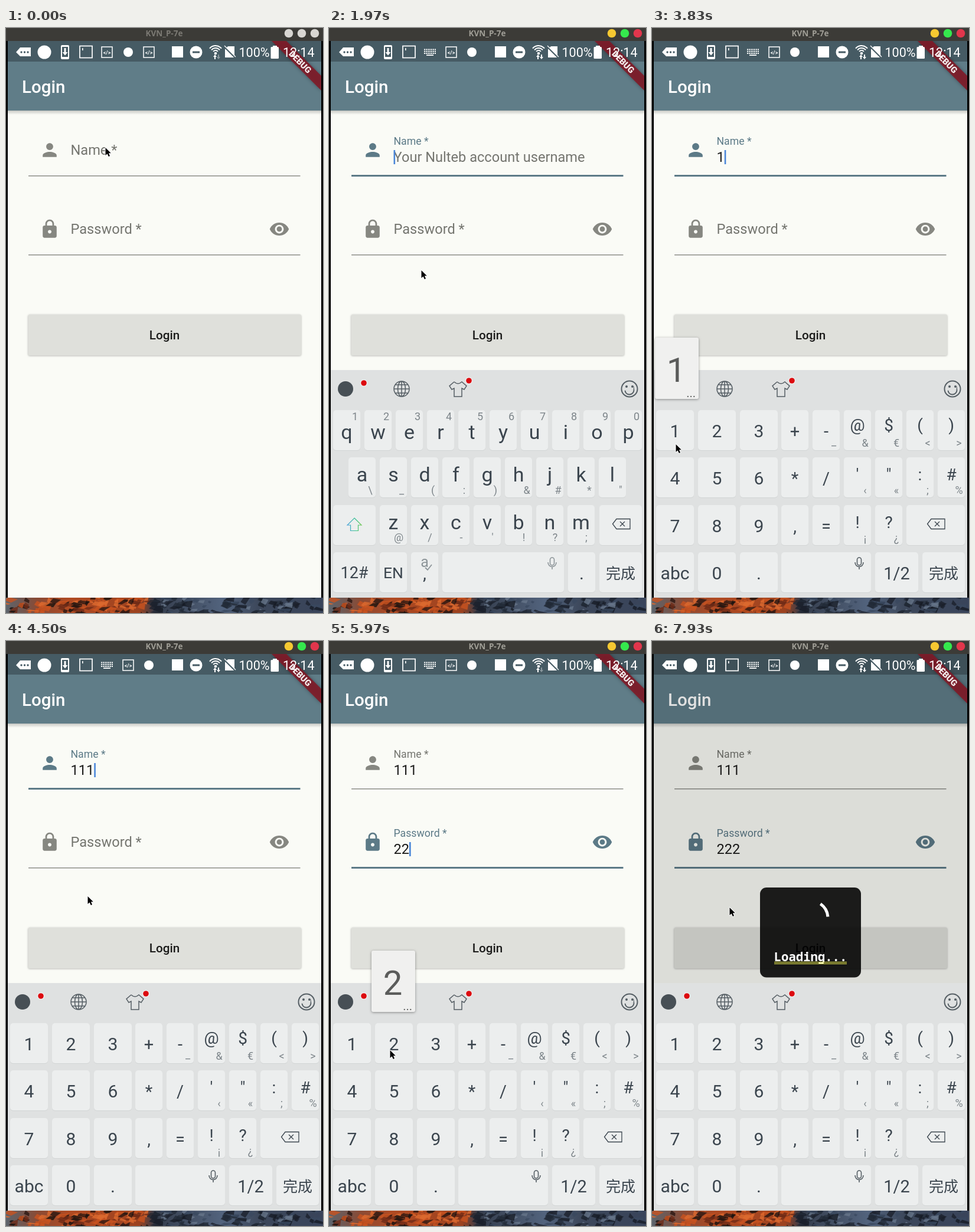
An HTML page with a canvas for the animation above (8 s loop, 537 by 992 pixels).

```html
<!DOCTYPE html>
<html lang="en">
<head>
<meta charset="utf-8">
<title>Login</title>
<style>
  html, body { margin: 0; width: 100%; height: 100%; overflow: hidden; background: #000; }
  canvas { display: block; width: 100vw; height: 100vh; }
</style>
</head>
<body>
<canvas id="stage" width="537" height="992"></canvas>
<script>
const LOOP = 8000, W = 537, H = 992, TAU = Math.PI * 2;
const ctx = document.getElementById('stage').getContext('2d');

const ONES = [3780, 4010, 4270], TWOS = [5650, 5930, 6150];
const NAME_FOCUS = 400, PASS_FOCUS = 5050, KEYS_IN = 1120, KEYS_SWAP = 3220, DIALOG = 6755;
const ACCENT = '#5c7a87', GREY = '#868781', HINT = '#74756f', INK = '#1c1c1b';

// time, x, y of the pointer tip
const POINTER = [
  [0, 168, 202], [650, 168, 202], [1200, 171, 285], [1750, 165, 300], [2500, 120, 830],
  [2970, 75, 948], [3300, 75, 948], [3720, 40, 705], [4290, 40, 705], [4500, 138, 432],
  [4850, 160, 340], [5100, 160, 340], [5550, 103, 697], [5970, 103, 693], [6200, 103, 693],
  [6600, 206, 526], [7000, 206, 526], [7700, 131, 451], [LOOP, 131, 451]
];

const PERSON = new Path2D('M12 12c2.21 0 4-1.79 4-4s-1.79-4-4-4-4 1.79-4 4 1.79 4 4 4zm0 2c-2.67 0-8 1.34-8 4v2h16v-2c0-2.66-5.33-4-8-4z');
const LOCK = new Path2D('M18 8h-1V6c0-2.76-2.24-5-5-5S7 3.24 7 6v2H6c-1.1 0-2 .9-2 2v10c0 1.1.9 2 2 2h12c1.1 0 2-.9 2-2V10c0-1.1-.9-2-2-2zm-6 9c-1.1 0-2-.9-2-2s.9-2 2-2 2 .9 2 2-.9 2-2 2zm3.1-9H8.9V6c0-1.71 1.39-3.1 3.1-3.1 1.71 0 3.1 1.39 3.1 3.1v2z');
const EYE = new Path2D('M12 4.5C7 4.5 2.73 7.61 1 12c1.73 4.39 6 7.5 11 7.5s9.27-3.11 11-7.5c-1.73-4.39-6-7.5-11-7.5zM12 17c-2.76 0-5-2.24-5-5s2.24-5 5-5 5 2.24 5 5-2.24 5-5 5zm0-8c-1.66 0-3 1.34-3 3s1.34 3 3 3 3-1.34 3-3-1.34-3-3-3z');
const ARROW = new Path2D('M.5 1V14L3.6 11.2 5.8 16 8 15 5.9 10.3H9.8Z');

const clamp = v => Math.max(0, Math.min(1, v));
const lerp = (a, b, p) => a + (b - a) * p;
const ramp = (t, start, len) => clamp((t - start) / len);

// cubic-bezier(.4, 0, .2, 1)
function fastOutSlowIn(x) {
  let lo = 0, hi = 1, u = x;
  for (let i = 0; i < 18; i++) {
    u = (lo + hi) / 2;
    const bx = 1.2 * u * (1 - u) ** 2 + 0.6 * u * u * (1 - u) + u ** 3;
    if (bx < x) lo = u; else hi = u;
  }
  return 3 * u * u * (1 - u) + u ** 3;
}

function text(g, s, x, y, size, color, align = 'left', weight = 400, family = 'Roboto, sans-serif') {
  g.font = `${weight} ${size}px ${family}`;
  g.textAlign = align;
  g.fillStyle = color;
  g.fillText(s, x, y);
}
function rect(g, x, y, w, h, color, r = 0) {
  g.fillStyle = color;
  g.beginPath();
  g.roundRect(x, y, w, h, r);
  g.fill();
}
function disc(g, x, y, r, color) {
  g.fillStyle = color;
  g.beginPath();
  g.arc(x, y, r, 0, TAU);
  g.fill();
}
function line(g, pts, color, width, closed = false) {
  g.strokeStyle = color;
  g.lineWidth = width;
  g.beginPath();
  pts.forEach(([x, y]) => g.lineTo(x, y));
  if (closed) g.closePath();
  g.stroke();
}
function poly(g, pts, color) {
  g.fillStyle = color;
  g.beginPath();
  pts.forEach(([x, y]) => g.lineTo(x, y));
  g.fill();
}
function icon(g, path, cx, cy, color) {
  g.save();
  g.translate(cx - 17.7, cy - 17.7);
  g.scale(1.475, 1.475);
  g.fillStyle = color;
  g.fill(path);
  g.restore();
}
function layer(paint) {
  const c = document.createElement('canvas');
  c.width = W;
  c.height = H;
  paint(c.getContext('2d'));
  return c;
}

// ---- keyboard ----
const ROWS = [648, 728, 809, 889], KEY_INK = '#3b454e', SUB_INK = '#7d858a';

function keyCap(g, x, row, w) {
  rect(g, x, ROWS[row] + 1, w, 68, '#d2d5d5', 5);
  rect(g, x, ROWS[row], w, 68, '#eceeee', 5);
}
function key(g, x, row, w, s, size, drop) {
  keyCap(g, x, row, w);
  text(g, s, x + w / 2, ROWS[row] + drop, size, KEY_INK, 'center');
}
function sub(g, s, x, y) { text(g, s, x, y, 18, SUB_INK, 'center'); }

function backspace(g, cx, cy) {
  line(g, [[cx - 14.5, cy], [cx - 8, cy - 8.5], [cx + 15, cy - 8.5], [cx + 15, cy + 8.5], [cx - 8, cy + 8.5]], KEY_INK, 1.3, true);
  line(g, [[cx - 2, cy - 4], [cx + 6, cy + 4]], KEY_INK, 1.3);
  line(g, [[cx + 6, cy - 4], [cx - 2, cy + 4]], KEY_INK, 1.3);
}
function mic(g, x, y, color) {
  g.strokeStyle = color;
  g.lineWidth = 1.6;
  g.beginPath();
  g.roundRect(x - 3.5, y - 10, 7, 13, 3.5);
  g.moveTo(x - 7, y - 2);
  g.bezierCurveTo(x - 7, y + 8, x + 7, y + 8, x + 7, y - 2);
  g.moveTo(x, y + 6);
  g.lineTo(x, y + 10);
  g.stroke();
}
function doneKey(g) {
  keyCap(g, 458, 3, 72);
  text(g, '完成', 494, 934, 25, KEY_INK, 'center', 400, '"Noto Sans CJK SC", "Noto Sans CJK", sans-serif');
}
function redDot(g, x, y) {
  disc(g, x, y, 6, '#f4f4f4');
  disc(g, x, y, 4.8, '#dc0a0f');
}
function toolbar(g) {
  rect(g, 3, 580, 531, 386, '#dfe1e1');
  disc(g, 28, 612, 13, '#474f55');
  redDot(g, 59, 602);
  g.strokeStyle = '#555e64';
  g.lineWidth = 1.5;
  g.beginPath();
  g.arc(123, 612, 13, 0, TAU);
  g.moveTo(129.5, 612);
  g.ellipse(123, 612, 6.5, 13, 0, 0, TAU);
  for (const [dx, y] of [[13, 612], [11, 605], [11, 619]]) {
    g.moveTo(123 - dx, y);
    g.lineTo(123 + dx, y);
  }
  g.moveTo(123, 599);
  g.lineTo(123, 625);
  g.stroke();
  g.beginPath();
  [[212, 600], [204, 607], [208, 613], [212, 611], [212, 625], [225, 625], [225, 611], [229, 613], [233, 607], [225, 600]]
    .forEach(([x, y]) => g.lineTo(x, y));
  g.quadraticCurveTo(218.5, 606, 212, 600);
  g.stroke();
  redDot(g, 237, 598);
  g.lineWidth = 2;
  g.beginPath();
  g.arc(509, 612, 13.5, 0, TAU);
  g.moveTo(516.5, 615);
  g.arc(509, 614, 7.5, 0.1, Math.PI - 0.1);
  g.stroke();
  disc(g, 504, 608, 2, '#555e64');
  disc(g, 514, 608, 2, '#555e64');
}

const letterBoard = layer(g => {
  toolbar(g);
  [...'qwertyuiop'].forEach((c, i) => {
    key(g, 7 + 53 * i, 0, 46, c, 34, 49);
    sub(g, String((i + 1) % 10), 44 + 53 * i, 665);
  });
  [...'asdfghjkl'].forEach((c, i) => {
    key(g, 33 + 53 * i, 1, 46, c, 34, 41);
    sub(g, '\\_(:)&#*"'[i], 70 + 53 * i, 790);
  });
  [...'zxcvbnm'].forEach((c, i) => {
    key(g, 86 + 53 * i, 2, 46, c, 34, 41);
    sub(g, "@/-'!?;"[i], 118 + 53 * i, 870);
  });
  keyCap(g, 7, 2, 72);
  const tint = g.createLinearGradient(30, 0, 56, 0);
  tint.addColorStop(0, '#4a9fe0');
  tint.addColorStop(0.6, '#36c48c');
  tint.addColorStop(1, '#79c84c');
  line(g, [[43, 831], [55, 843], [49.5, 843], [49.5, 852.5], [36.5, 852.5], [36.5, 843], [31, 843]], tint, 1.2, true);
  keyCap(g, 458, 2, 72);
  backspace(g, 495, 841);
  key(g, 7, 3, 72, '12#', 27, 44);
  key(g, 86, 3, 46, 'EN', 26.5, 44);
  key(g, 139, 3, 46, ',', 30, 46);
  text(g, 'a', 162, 914, 25, '#8d9599', 'center');
  line(g, [[163, 915], [167, 919], [174, 910]], '#8d9599', 1.8);
  keyCap(g, 192, 3, 206);
  mic(g, 378, 908, '#8d9599');
  key(g, 405, 3, 46, '.', 30, 46);
  doneKey(g);
});

const numberBoard = layer(g => {
  toolbar(g);
  ['123', '456', '789'].forEach((row, r) => [...row].forEach((c, i) => key(g, 7 + 71 * i, r, 64, c, 30, 46)));
  ['+-', '*/', ',='].forEach((row, r) => [...row].forEach((c, i) => key(g, 219 + 53 * i, r, 46, c, 29, 46)));
  sub(g, '_', 308, 708);
  ['@$()', "'\":#", '!?'].forEach((row, r) => [...row].forEach((c, i) => {
    key(g, 325 + 53 * i, r, 46, c, 28, r ? 39 : 35);
    sub(g, ['&€<>', '‹«;%', '¡¿'][r][i], 361 + 53 * i, ROWS[r] + 62);
  }));
  keyCap(g, 431, 2, 99);
  backspace(g, 481, 841);
  ['abc', '0', '.'].forEach((s, i) => key(g, 7 + 71 * i, 3, 64, s, 30, 46));
  keyCap(g, 219, 3, 152);
  mic(g, 351, 908, '#555e64');
  key(g, 378, 3, 73, '1/2', 29, 46);
  doneKey(g);
});

function keyboard(t) {
  if (t < KEYS_IN) return;
  const p = 1 - (1 - ramp(t, KEYS_IN, 160)) ** 2;
  ctx.save();
  ctx.beginPath();
  ctx.rect(3, 22, 531, 944);
  ctx.clip();
  ctx.globalAlpha = p;
  ctx.drawImage(t < KEYS_SWAP ? letterBoard : numberBoard, 0, Math.round(88 * (1 - p)));
  ctx.restore();
  if (t > 3110 && t < KEYS_SWAP) rect(ctx, 7, 889, 72, 68, 'rgba(0,0,0,.1)', 5);
  const pressed = list => list.some(at => t >= at && t < at + 110);
  if (pressed(ONES)) preview('1', 5);
  if (pressed(TWOS)) preview('2', 72);
}
function preview(s, x) {
  ctx.save();
  ctx.shadowColor = 'rgba(0,0,0,.4)';
  ctx.shadowBlur = 4;
  ctx.shadowOffsetY = 1;
  rect(ctx, x, 525, 74, 104, '#f0f0ef', 3);
  ctx.restore();
  text(ctx, s, x + 36, 600, 58, '#5b5c5b', 'center');
  text(ctx, '...', x + 69, 626, 20, '#5b5c5b', 'right');
}

// ---- window and desktop ----
const desktop = layer(g => {
  let seed = 11;
  const rnd = () => (seed = (seed * 16807) % 2147483647) / 2147483647;
  const fade = g.createLinearGradient(0, 0, W, 0);
  [[0, '#5c646c'], [0.1, '#8a4a34'], [0.2, '#b04a22'], [0.42, '#9c421f'], [0.47, '#343c4b'], [0.68, '#52637d'], [0.8, '#3c475a'], [1, '#39445a']]
    .forEach(([at, c]) => fade.addColorStop(at, c));
  rect(g, 0, 966, W, 26, fade);
  const warm = ['#17110f', '#2b1712', '#dd6a2f', '#c9521f', '#6e2a16'];
  const cool = ['#171c26', '#222a37', '#66758a', '#3a485f', '#1b212c'];
  g.globalAlpha = 0.8;
  for (let i = 0; i < 190; i++) {
    const x = rnd() * W, y = 962 + rnd() * 28, tones = x < 240 ? warm : cool;
    const a = 4 + rnd() * 13, b = 3 + rnd() * 10;
    poly(g, [[x, y], [x + a, y + b * (rnd() - 0.3)], [x + a * rnd(), y + b], [x - a * 0.4, y + b * 0.6]], tones[Math.floor(rnd() * 5)]);
  }
  g.clearRect(0, 900, W, 66);
});

function chrome(t) {
  const active = t >= NAME_FOCUS - 60;
  rect(ctx, 0, 0, W, H, '#000');
  ctx.drawImage(desktop, 0, 0);
  rect(ctx, 0, 0, W, 22, '#3c3b37');
  text(ctx, 'KVN_P-7e', 268, 14, 13.5, active ? '#a09e96' : '#7c7a74', 'center', 700, '"Open Sans", sans-serif');
  (active ? ['#f6c831', '#35e84d', '#e1364c'] : ['#d8d6d2', '#d8d6d2', '#d8d6d2'])
    .forEach((c, i) => disc(ctx, 479 + 22 * i, 9, 7.3, c));
}

// ---- status bar ----
const BAR = '#465b64';
function codeIcon(x) {
  ctx.strokeStyle = '#fff';
  ctx.lineWidth = 1.5;
  ctx.strokeRect(x - 9, 32, 18, 18);
  text(ctx, '</>', x, 44.5, 9, '#fff', 'center', 700);
}
function keysIcon(x) {
  for (let r = 0; r < 3; r++)
    for (let c = 0; c < 7; c++) rect(ctx, x - 10 + c * 3, 35.5 + r * 3.2, 2, 2, '#fff');
  rect(ctx, x - 6, 45.2, 12, 1.8, '#fff');
}
function statusBar(t) {
  poly(ctx, [[17, 41], [24, 33], [42, 33], [42, 48], [24, 48]], '#fff');
  for (const x of [26, 31.5, 37]) disc(ctx, x, 41, 1.7, BAR);
  disc(ctx, 65, 41, 11.5, '#fff');
  rect(ctx, 93, 29, 14, 24, '#fff', 2);
  rect(ctx, 95, 32, 10, 17, BAR);
  rect(ctx, 98.5, 34, 3, 8, '#fff');
  poly(ctx, [[95.5, 41], [104.5, 41], [100, 46.5]], '#fff');
  ctx.strokeStyle = '#fff';
  ctx.lineWidth = 1.7;
  ctx.strokeRect(125, 30.5, 21, 20);
  rect(ctx, 129, 34, 1.6, 4, '#fff');
  if (t < KEYS_IN - 30) {
    codeIcon(171);
    disc(ctx, 207, 41, 8, '#fff');
    codeIcon(242);
  } else {
    keysIcon(171);
    codeIcon(207);
    disc(ctx, 242, 41, 8, '#fff');
  }
  rect(ctx, 281, 31, 19, 19, '#fff');
  disc(ctx, 322, 41, 10.5, '#fff');
  rect(ctx, 316, 39.5, 12, 3, BAR);

  ctx.strokeStyle = '#fff';
  ctx.lineWidth = 2;
  for (const r of [5, 9, 13]) {
    ctx.beginPath();
    ctx.arc(355, 43, r, -Math.PI * 0.78, -Math.PI * 0.22);
    ctx.stroke();
  }
  disc(ctx, 355, 43, 2.3, '#fff');
  const quiet = t < 380 || (t > 5300 && t < 6400);
  poly(ctx, [[351, 49], [354, 45], [357, 49], [355, 49], [355, 53], [353, 53], [353, 49]], '#fff');
  poly(ctx, [[357, 49], [359, 49], [359, 45], [361, 45], [361, 49], [363, 49], [360, 53]], quiet ? '#8a979d' : '#fff');
  poly(ctx, [[376, 31], [387, 31], [387, 50], [371, 50], [371, 36]], '#fff');
  line(ctx, [[369, 31], [389, 51]], BAR, 2.5);
  line(ctx, [[370, 30], [389, 49]], '#fff', 1.3);

  text(ctx, '100%', 394.5, 49, 21.5, '#fff');
  rect(ctx, 452, 30, 7, 4, '#fff');
  rect(ctx, 448.5, 32, 13.5, 20, '#fff', 1.5);
  text(ctx, '12:14', 469, 49, 21.5, '#fff');
}
function banner() {
  ctx.save();
  ctx.shadowColor = 'rgba(0,0,0,.4)';
  ctx.shadowBlur = 6;
  ctx.beginPath();
  ctx.rect(3, 22, 531, 944);
  ctx.clip();
  poly(ctx, [[450, 22], [475, 22], [534, 81], [534, 106]], 'rgba(130,24,38,.88)');
  ctx.restore();
  ctx.save();
  ctx.translate(498.5, 57.5);
  ctx.rotate(Math.PI / 4);
  text(ctx, 'DEBUG', 0, 5.3, 14.6, '#f4ecec', 'center', 900);
  ctx.restore();
}

// ---- form ----
function field(t, f) {
  const rise = fastOutSlowIn(ramp(t, f.from, 100));
  const active = t >= f.from && t < f.to;
  const color = active ? ACCENT : GREY;
  icon(ctx, f.icon, 74, f.y - 43, color);
  text(ctx, f.label, 109.5, lerp(f.y - 35, f.y - 52, rise), lerp(23.6, 17.7, rise), active ? ACCENT : HINT);
  const value = f.char.repeat(f.hits.filter(at => t >= at).length);
  if (value) text(ctx, value, 109.5, f.y - 23, 23.6, INK);
  else if (rise > 0) {
    ctx.globalAlpha = rise;
    text(ctx, f.hint, 109.5, f.y - 23, 23.6, HINT);
    ctx.globalAlpha = 1;
  }
  if (active) rect(ctx, 38, f.y - 1, 460.5, 3, ACCENT);
  else rect(ctx, 38, f.y, 460.5, 1.4, '#8d8e89');
  if (!active || t >= DIALOG) return;
  const last = Math.max(f.from, ...f.hits.filter(at => at <= t));
  if (Math.floor((t - last) / 250) % 2) return;
  ctx.font = '400 23.6px Roboto, sans-serif';
  rect(ctx, 109.5 + ctx.measureText(value).width, f.y - 43, 2.6, 24, '#4a86d9');
}
const FIELDS = [
  { y: 250, icon: PERSON, label: 'Name *', hint: 'Your Nulteb account username', char: '1', hits: ONES, from: NAME_FOCUS, to: PASS_FOCUS },
  { y: 384, icon: LOCK, label: 'Password *', hint: 'Your Nulteb account password', char: '2', hits: TWOS, from: PASS_FOCUS, to: LOOP }
];
function page(t) {
  rect(ctx, 3, 22, 531, 944, '#fafbf6');
  const shade = ctx.createLinearGradient(0, 140, 0, 147);
  shade.addColorStop(0, 'rgba(0,0,0,.2)');
  shade.addColorStop(1, 'rgba(0,0,0,0)');
  rect(ctx, 3, 140, 531, 7, shade);
  rect(ctx, 3, 57, 531, 83, '#607d88');
  rect(ctx, 3, 22, 531, 35, BAR);
  text(ctx, 'Login', 27, 110, 29.5, '#fff', 'left', 500);
  FIELDS.forEach(f => field(t, f));
  icon(ctx, EYE, 463, 341, t >= PASS_FOCUS ? ACCENT : GREY);
  ctx.save();
  ctx.shadowColor = 'rgba(0,0,0,.3)';
  ctx.shadowBlur = 3;
  ctx.shadowOffsetY = 0.5;
  rect(ctx, 37.5, 486, 462.5, 69.5, '#dfe0db', 3);
  ctx.restore();
  text(ctx, 'Login', 268.5, 528, 20.65, INK, 'center', 500);
}

// ---- loading dialog ----
function dialog(t) {
  const p = ramp(t, DIALOG, 85);
  if (!p) return;
  rect(ctx, 3, 22, 531, 944, `rgba(0,0,0,${0.12 * p})`);
  ctx.save();
  ctx.globalAlpha = p;
  rect(ctx, 183, 418, 171, 152.5, 'rgba(0,0,0,.88)', 11);
  const turn = 2.94 + (t - 6830) / 506;
  const step = Math.floor(turn) % 5, part = turn % 1;
  const head = fastOutSlowIn(clamp(part * 2)), tail = fastOutSlowIn(clamp(part * 2 - 1));
  const start = Math.PI * (-0.5 + 1.5 * tail + 1.7 * part - 0.8 * step);
  ctx.strokeStyle = '#fff';
  ctx.lineWidth = 5;
  ctx.beginPath();
  ctx.arc(268.5, 470, 29.5, start, start + Math.max(0.12, 1.5 * Math.PI * (head - tail)));
  ctx.stroke();
  text(ctx, 'Loading...', 268.5, 543, 20.6, '#fff', 'center', 600, '"Noto Sans Mono", monospace');
  rect(ctx, 207, 544, 123, 1.3, '#d9dc48');
  rect(ctx, 207, 546.7, 123, 1.3, '#d9dc48');
  ctx.restore();
}

function pointer(t) {
  const i = Math.max(1, POINTER.findIndex(k => k[0] > t));
  const [t0, x0, y0] = POINTER[i - 1], [t1, x1, y1] = POINTER[i];
  const u = (t - t0) / (t1 - t0), p = u * u * (3 - 2 * u);
  ctx.save();
  ctx.translate(Math.round(lerp(x0, x1, p)), Math.round(lerp(y0, y1, p)));
  ctx.lineJoin = 'round';
  ctx.strokeStyle = '#fff';
  ctx.lineWidth = 1.8;
  ctx.stroke(ARROW);
  ctx.fillStyle = '#000';
  ctx.fill(ARROW);
  ctx.restore();
}

function draw(now) {
  const t = now % LOOP;
  chrome(t);
  page(t);
  dialog(t);
  banner();
  statusBar(t);
  keyboard(t);
  pointer(t);
}

let begin;
function tick(now) {
  begin ??= now;
  draw(now - begin);
  requestAnimationFrame(tick);
}
draw(0);
requestAnimationFrame(tick);
</script>
</body>
</html>
```
